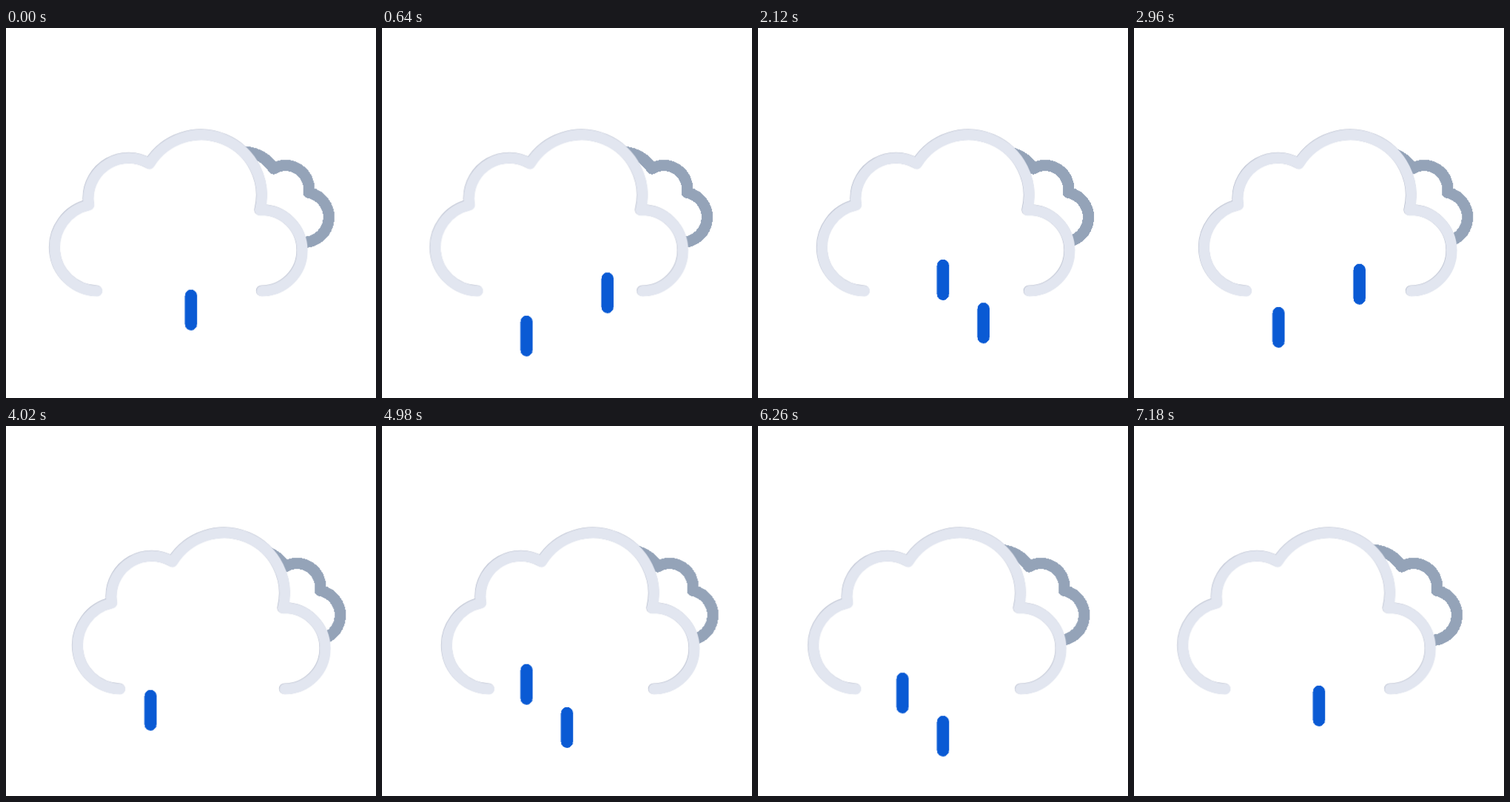
An HTML page for the animation above (7200 ms loop, 500 px wide and 500 px high).

```html
<!DOCTYPE html>
<html lang="en">
<head>
<meta charset="utf-8">
<title>Overcast with rain</title>
<style>
  html, body { margin: 0; width: 100%; height: 100%; overflow: hidden; background: #fff; }
  svg { display: block; width: 100%; height: 100%; }

  .cloud {
    fill: none;
    stroke-linecap: round;
    stroke-linejoin: round;
    animation: drift 3600ms linear infinite alternate;
  }
  .back { --reach: 9px; stroke: #94a3b8; stroke-width: 15.7; shape-rendering: crispEdges; }
  .front { --reach: 18px; }
  .edge { fill: #fff; stroke: #b3b9ca; stroke-width: 15; transform: translate(-.5px, -.5px); }
  .body { stroke: #e2e6f0; stroke-width: 14.8; }

  .drop {
    fill: #0a5ad4;
    stroke: #0a5ad4;
    stroke-width: .6;
    shape-rendering: crispEdges;
    animation: fall 1200ms linear infinite, show 1200ms step-end infinite;
    animation-delay: var(--delay);
  }

  @keyframes drift {
    from { transform: translateX(calc(-1 * var(--reach))); }
    to { transform: translateX(var(--reach)); }
  }
  @keyframes fall {
    0% { transform: translateY(0); }
    67%, 100% { transform: translateY(120px); }
  }
  @keyframes show {
    0% { opacity: 0; }
    5.83% { opacity: 1; }
    60.83%, 100% { opacity: 0; }
  }
</style>
</head>
<body>
<svg viewBox="0 0 512 512">
  <defs>
    <path id="outline" d="M295.5 223.5a56 56 0 0 0 0-112l-2.5.1A83.9 83.9 0 0 0 140.1 47.4a56 56 0 0 0-84.6 48.1 56.6 56.6 0 0 0 .8 9 60.2 60.2 0 0 0 11.2 119"/>
  </defs>

  <g transform="translate(256.3 171)">
    <path class="cloud back" d="M.5 93.2a32.4 32.4 0 0 0 32.4 32.4h129.8v-.1l2.3.1a34.8 34.8 0 0 0 6.5-68.9 32.4 32.4 0 0 0-48.5-33 48.6 48.6 0 0 0-88.6 37.1h-1.5A32.4 32.4 0 0 0 .5 93.2Z"/>
  </g>

  <g transform="translate(76.5 140.5)">
    <g class="cloud front">
      <use href="#outline" class="edge"/>
      <use href="#outline" class="body"/>
    </g>
  </g>

  <g transform="translate(192 302.4)">
    <rect class="drop" style="--delay: 0ms" width="16" height="56" rx="8"/>
    <rect class="drop" style="--delay: -400ms" x="56" width="16" height="56" rx="8"/>
    <rect class="drop" style="--delay: -800ms" x="112" width="16" height="56" rx="8"/>
  </g>
</svg>
</body>
</html>
```
